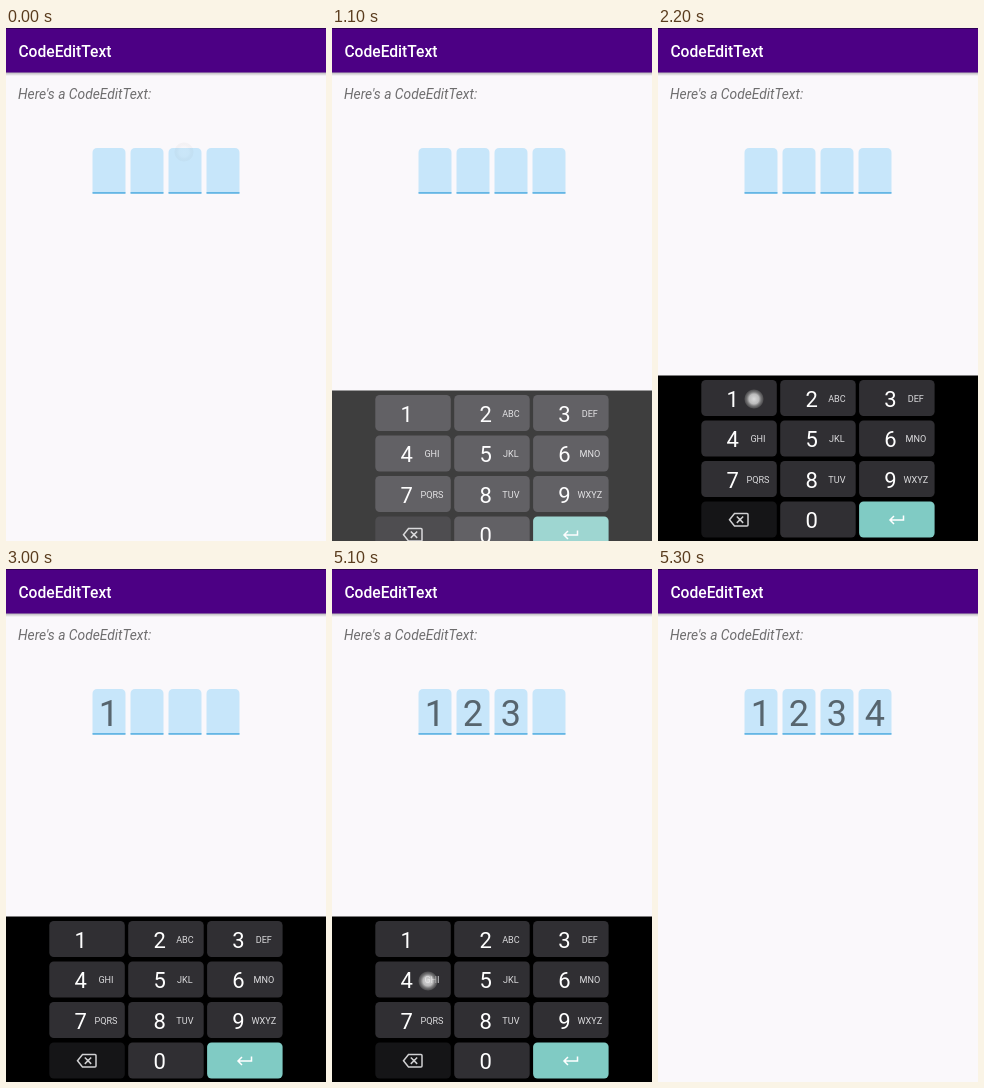
Write an HTML page that moves like this. It is 320 px wide and 513 px high and loops after 6000 ms.

```html
<!DOCTYPE html>
<html lang="en">
<head>
<meta charset="utf-8">
<title>CodeEditText</title>
<style>
  html, body { margin: 0; width: 100%; height: 100%; overflow: hidden; background: #faf8fb; }
  svg { display: block; width: 100vw; height: 100vh; }
  text { font-family: Roboto, sans-serif; }
  .title { font-size: 15.6px; font-weight: 500; fill: #fff; }
  .label { font-size: 13.8px; font-style: italic; fill: rgba(0, 0, 0, .56); }
  .code { font-size: 36px; fill: rgba(0, 0, 0, .56); text-anchor: middle; }
  .digit { font-size: 22px; fill: #fff; text-anchor: middle; }
  .letters { font-size: 9.1px; fill: #dcdcde; text-anchor: middle; }
  .icon { fill: none; stroke-width: 1.5; }
</style>
</head>
<body>
<svg viewBox="0 0 320 513" preserveAspectRatio="none">
  <defs>
    <linearGradient id="shadow" x1="0" y1="0" x2="0" y2="1">
      <stop offset="0" stop-color="#000" stop-opacity=".3"/>
      <stop offset="1" stop-color="#000" stop-opacity="0"/>
    </linearGradient>
    <radialGradient id="touch">
      <stop offset="0" stop-color="#eee" stop-opacity=".9"/>
      <stop offset=".5" stop-color="#ddd" stop-opacity=".8"/>
      <stop offset=".72" stop-color="#999" stop-opacity=".65"/>
      <stop offset=".9" stop-color="#777" stop-opacity=".5"/>
      <stop offset="1" stop-color="#666" stop-opacity="0"/>
    </radialGradient>
  </defs>
  <rect width="320" height="513" fill="#faf8fb"/>
  <rect y="44" width="320" height="4" fill="url(#shadow)"/>
  <rect width="320" height="44.5" fill="#4c0084"/>
  <rect width="320" height="1" fill="#2e0054"/>
  <text class="title" x="12.4" y="28.9">CodeEditText</text>
  <text class="label" x="12" y="71.2">Here's a CodeEditText:</text>
  <g id="fields"></g>
  <g id="keyboard"><rect y="347.5" width="320" height="240" fill="#000"/></g>
  <circle id="dot" r="10" fill="url(#touch)"/>
</svg>
<script>
const LOOP = 6000, STEP = 100;
const SVG = 'http://www.w3.org/2000/svg';
const byId = id => document.getElementById(id);
const fields = byId('fields'), keyboard = byId('keyboard'), dot = byId('dot');

function add(parent, tag, attrs, text) {
  const el = document.createElementNS(SVG, tag);
  for (const name in attrs) el.setAttribute(name, attrs[name]);
  if (text) el.textContent = text;
  return parent.appendChild(el);
}

// Each digit appears right after the tap on its key.
const typedAt = [2300, 3500, 4200, 5200];
const digits = typedAt.map((at, i) => {
  const x = 86.5 + i * 38;
  add(fields, 'path', {
    d: `M${x} 165v-40q0-5 5-5h23q5 0 5 5v40z`, fill: '#c7e6fa'
  });
  add(fields, 'rect', { x, y: 164.2, width: 33, height: 1.5, fill: '#4dabe0' });
  return add(fields, 'text', { class: 'code', x: x + 16.3, y: 157.3 }, String(i + 1));
});

const letters = ['', 'ABC', 'DEF', 'GHI', 'JKL', 'MNO', 'PQRS', 'TUV', 'WXYZ'];
const labels = ['1', '2', '3', '4', '5', '6', '7', '8', '9', '', '0', ''];
labels.forEach((label, i) => {
  const x = 43.3 + (i % 3) * 78.9, y = 352 + Math.floor(i / 3) * 40.5;
  const fill = i === 9 ? '#151517' : i === 11 ? '#80cbc4' : '#302f33';
  add(keyboard, 'rect', { x, y, width: 75.5, height: 36, rx: 4.5, fill });
  if (label) add(keyboard, 'text', { class: 'digit', x: x + 31.4, y: y + 26.5 }, label);
  if (letters[i]) add(keyboard, 'text', { class: 'letters', x: x + 56.7, y: y + 21.5 }, letters[i]);
});
add(keyboard, 'path', {
  class: 'icon', stroke: '#d0d0d2',
  d: 'M76.5 485.5H89q1 0 1 1v10.500q0 1-1 1H76.500L71.500 491.700zM78.800 488.500l6.400 6.400M85.200 488.500l-6.400 6.400'
});
add(keyboard, 'path', {
  class: 'icon', stroke: '#fff',
  d: 'M245.500 487.500v4.500H232M236 488l-4 4 4 4'
});

const taps = [
  { at: 800, x: 178, y: 124 },
  { at: 2100, x: 96, y: 371 },
  { at: 3300, x: 174, y: 375 },
  { at: 4000, x: 254, y: 372 },
  { at: 5000, x: 96, y: 412 }
];

function drawTouch(t) {
  const tap = taps.find(p => t >= p.at && t < p.at + 300);
  const { x, y } = tap || taps[0];
  let alpha = t < 100 ? .1 : 0;
  if (tap) alpha = t < tap.at + 200 ? 1 : tap === taps[0] || tap === taps[4] ? 0 : .35;
  dot.setAttribute('cx', x);
  dot.setAttribute('cy', y);
  dot.setAttribute('opacity', alpha);
}

const clamp = v => Math.max(0, Math.min(1, v));

function draw(t) {
  const shown = clamp((t - 1000) / 200) * (1 - clamp((t - 5100) / 200));
  const eased = 1 - (1 - shown) ** 2;
  keyboard.setAttribute('opacity', eased);
  keyboard.setAttribute('transform', `translate(0 ${60 * (1 - eased)})`);
  digits.forEach((el, i) => el.setAttribute('opacity', t >= typedAt[i] ? 1 : 0));
  drawTouch(t);
}

const start = performance.now();
function tick() {
  const t = (performance.now() - start) % LOOP;
  draw(Math.floor(t / STEP) * STEP);
  requestAnimationFrame(tick);
}
tick();
</script>
</body>
</html>
```
